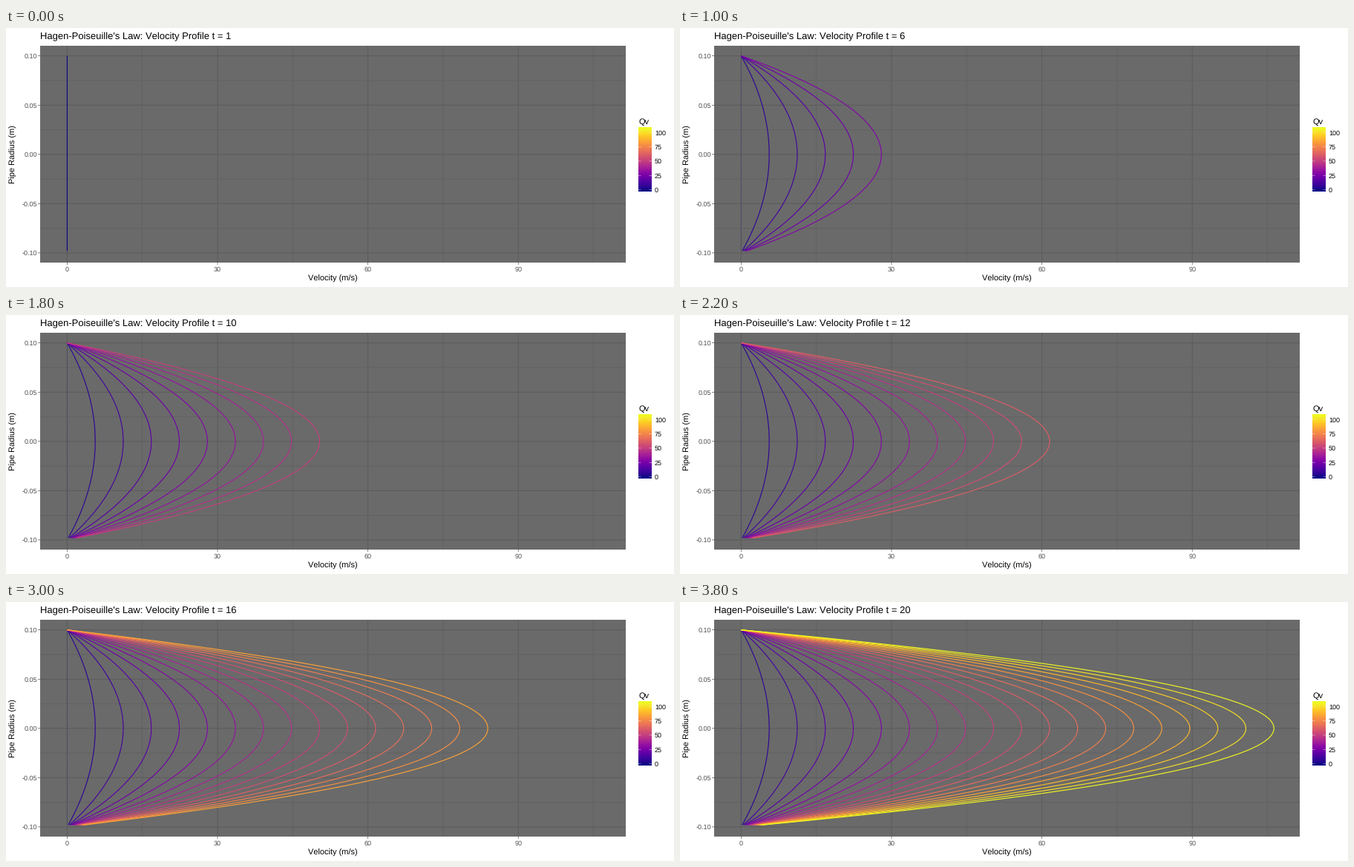
A matplotlib script for the animation above (4000 ms loop, 900 px wide and 350 px high).

```python
import numpy as np
import matplotlib.pyplot as plt
from matplotlib.animation import FuncAnimation

W, H, DPI = 900, 350, 100
PX = 72 / DPI                      # points per pixel
STEPS = 20
V_MAX = 106.3                      # peak velocity of the last profile
RADIUS = 0.1
LEFT, RIGHT, TOP, BOTTOM = 46, 835, 24, 317

plt.rcParams["font.family"] = "Liberation Sans"
plt.rcParams["text.hinting"] = "none"
plt.rcParams["text.hinting_factor"] = 1
cmap = plt.get_cmap("plasma")

fig = plt.figure(figsize=(W / DPI, H / DPI), dpi=DPI, facecolor="white")
ax = fig.add_axes([0, 0, 1, 1])
ax.axis("off")


def sx(v):
    return 82.4 + 6.753 * v


def sy(r):
    return 170.8 - 1331 * r


def line(xs, ys, color, width=1.0, **kw):
    return ax.plot(xs, ys, color=color, lw=width * PX, snap=False,
                   solid_capstyle="butt", **kw)[0]


def label(x, y, s, size, color="black", ha="left"):
    return ax.text(x, y, s, fontsize=size * PX, color=color, ha=ha,
                   va="baseline")


def draw_panel():
    ax.add_patch(plt.Rectangle((LEFT, TOP), RIGHT - LEFT, BOTTOM - TOP,
                               fc="#6a6a6a", lw=0, zorder=0))
    for i in range(8):
        x = sx(15 * i)
        major = i % 2 == 0
        line([x, x], [TOP, BOTTOM], "#5b5b5b" if major else "#626262")
        if major:
            line([x, x], [BOTTOM, BOTTOM + 3], "#333333", 0.6)
            label(x, 329, str(15 * i), 9, "#4d4d4d", "center")
    for i in range(-4, 5):
        y = sy(0.025 * i)
        major = i % 2 == 0
        line([LEFT, RIGHT], [y, y], "#5b5b5b" if major else "#626262")
        if major:
            line([LEFT - 3, LEFT], [y, y], "#333333", 0.6)
            label(42, y + 3.3, f"{0.025 * i:.2f}", 9, "#4d4d4d", "right")
    label((LEFT + RIGHT) / 2, 342, "Velocity (m/s)", 11.1, ha="center")
    ax.text(15.5, 171, "Pipe Radius (m)", fontsize=11.1 * PX, rotation=90,
            ha="right", va="center")


def draw_legend():
    x0, x1, y0, y1 = 852, 870, 134, 221
    pad = (y1 - y0) / 40           # half of one of 20 colour bins
    zero, span = y1 - pad, y1 - y0 - 2 * pad
    ys = np.linspace(y0, y1, 256)
    ramp = np.clip((zero - ys) / span, 0, 1)[:, None]
    ax.imshow(ramp, cmap=cmap, vmin=0, vmax=1, extent=(x0, x1, y1, y0),
              aspect="auto", interpolation="nearest", zorder=2)
    for q in range(0, 101, 25):
        y = zero - span * q / V_MAX
        for a, b in ((x0, x0 + 3.5), (x1 - 3.5, x1)):
            line([a, b], [y, y], "white", 0.4, zorder=3)
        label(874, y + 3.4, str(q), 9)
    label(852.5, 130, "Qv", 11)


draw_panel()
draw_legend()
title = label(46, 15, "", 13.1)

r = np.linspace(-0.098, RADIUS, 100)
shape = 1 - (r / RADIUS) ** 2
curves = []
for j in range(STEPS):
    f = j / (STEPS - 1)
    curves.append(line(sx(V_MAX * f * shape), sy(r), cmap(f), 1.15,
                       zorder=4 + j))

ax.set_xlim(0, W)
ax.set_ylim(H, 0)


def update(k):
    title.set_text(f"Hagen-Poiseuille's Law: Velocity Profile t = {k + 1}")
    for j, c in enumerate(curves):
        c.set_visible(j <= k)
    # the resting profile fades once the flow starts
    curves[0].set_alpha(1 if k == 0 else 0.3)
    curves[0].set_linestyle("-" if k == 0 else (0, (1, 1)))
    return [title, *curves]


anim = FuncAnimation(fig, update, frames=STEPS, interval=200,
                     init_func=lambda: update(0), repeat=True,
                     repeat_delay=0, blit=False)
plt.show()
```
